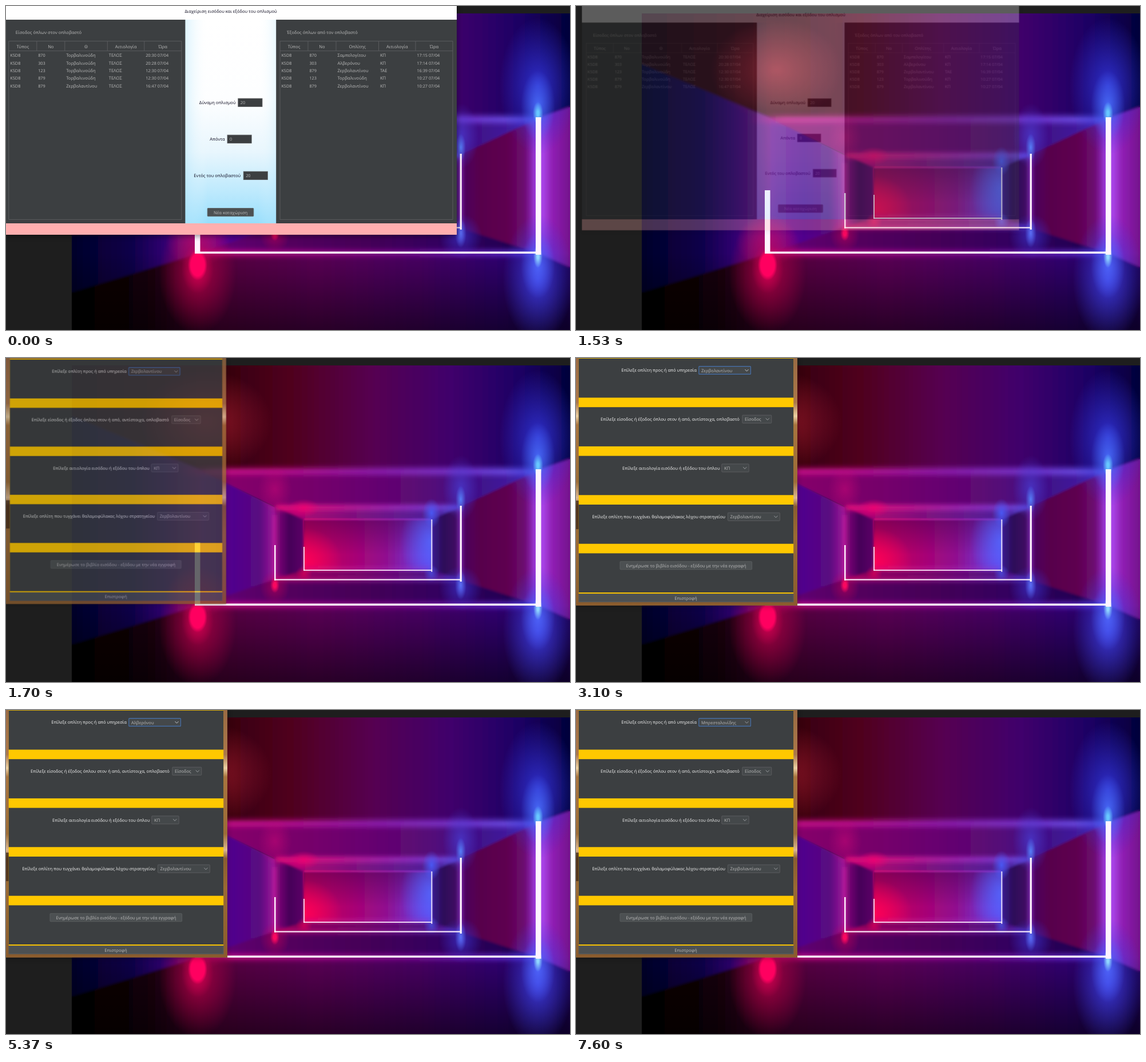
These frames come from a looping animation (986 by 568 pixels, 8000 ms). An HTML page:

```html
<!DOCTYPE html>
<html lang="el">
<head>
<meta charset="utf-8">
<title>Οπλοβαστός</title>
<style>
html, body { margin: 0; width: 100%; height: 100%; overflow: hidden; background: #1e1e1e; }
svg { display: block; width: 986px; height: 568px; }
text { font: 7.6px "Open Sans", "Noto Sans", sans-serif; fill: #bbb; text-rendering: geometricPrecision; white-space: pre; }
.num { font-size: 7.3px; }
.mid { text-anchor: middle; }
.dark { fill: #0c0a1e; }
.white { fill: #f4f4f4; }
.panel { fill: #3c3f41; }
.line { fill: none; stroke: #616365; stroke-width: .8; }
.box { fill: #44484a; stroke: #616365; stroke-width: .8; }
.btn { fill: #4c5052; stroke: #5e6163; stroke-width: .8; }
.chev { fill: none; stroke: #9a9da0; stroke-width: 1; }

/* 1% of the loop is 80 ms */
.anim { animation: 8s step-end infinite; }
#list { transform-origin: 392px 170px; animation-name: leave; }
#form { transform-origin: 193px 185px; animation-name: enter; }
#listShade { animation-name: unfocus; }
#newBtn { animation-name: hover; }
#drop { animation-name: drop; }
#mark { animation-name: mark; }
#chev { animation-name: chev; }
#pick0 { animation-name: pick0; }
#pick1 { animation-name: pick1; }
#pick2 { animation-name: pick2; }

@keyframes leave {
  0% { opacity: 1; transform: none; }
  17.625% { opacity: .99; transform: scale(.999); }
  17.875% { opacity: .95; transform: scale(.997); }
  18.25% { opacity: .87; transform: scale(.9937); }
  18.75% { opacity: .58; transform: scale(.982); }
  19.125% { opacity: .28; transform: scale(.966); }
  19.5% { opacity: .09; transform: scale(.945); }
  19.875%, 100% { opacity: 0; transform: scale(.92); }
}
@keyframes enter {
  0% { opacity: 0; transform: scale(.92); }
  19.875% { opacity: .08; transform: scale(.935); }
  20.375% { opacity: .34; transform: scale(.962); }
  20.75% { opacity: .59; transform: scale(.979); }
  21.25% { opacity: .79; transform: scale(.989); }
  21.75% { opacity: .92; transform: scale(.995); }
  22.25% { opacity: .98; transform: scale(.998); }
  23.125%, 100% { opacity: 1; transform: none; }
}
@keyframes unfocus { 0% { opacity: .4; } 14.875% { opacity: .3; } 15.375%, 100% { opacity: .2; } }
@keyframes hover { 0% { fill: #4c5052; } 6.25%, 100% { fill: #55595c; } }
@keyframes drop {
  0% { opacity: 0; } 44.875% { opacity: 1; } 58.125% { opacity: 0; }
  72.625% { opacity: 1; } 95%, 100% { opacity: 0; }
}
@keyframes mark {
  0% { transform: none; }
  49.625% { transform: translateY(13.36px); }
  50.25% { transform: translateY(26.72px); }
  50.875% { transform: translateY(53.44px); }
  51.375% { transform: translateY(66.8px); }
  77.25% { transform: translateY(13.36px); }
  77.75% { transform: translateY(26.72px); }
  78.625% { transform: translateY(40.08px); }
  79.625% { transform: translateY(66.8px); }
  82.125% { transform: translateY(53.44px); }
  86.5% { transform: translateY(66.8px); }
  86.875% { transform: translateY(93.52px); }
  87.25%, 100% { transform: translateY(106.88px); }
}
@keyframes chev {
  0% { stroke: #9a9da0; } 38.75% { stroke: #c4c7ca; } 49.625% { stroke: #9a9da0; }
  67.125% { stroke: #c4c7ca; } 77.25%, 100% { stroke: #9a9da0; }
}
@keyframes pick0 { 0% { opacity: 1; } 58.125%, 100% { opacity: 0; } }
@keyframes pick1 { 0% { opacity: 0; } 58.125% { opacity: 1; } 95%, 100% { opacity: 0; } }
@keyframes pick2 { 0% { opacity: 0; } 95%, 100% { opacity: 1; } }
</style>
</head>
<body>
<script>
const people = ['Ζερβολαντίνου', 'Τορβαλινούδη', 'Λόρβας', 'Φελουμάντης', 'Εξμορίδης',
  'Αλβερόνου', 'Σαμπελογίτου', 'Ζάλβης', 'Μπρεσταλονίδης', 'Γκιρβάλκος',
  'Βελμουάδης', 'Νερφλάκης', 'Εσβολίου', 'Ροδαμινελάου', 'Χαλβεμιτόπουλος'];

// Drawing helpers; text is placed by the middle of its capitals
const rect = (x, y, w, h, attrs) => `<rect x="${x}" y="${y}" width="${w}" height="${h}" ${attrs}/>`;
const poly = (points, fill) => `<polygon points="${points}" fill="${fill}"/>`;
const text = (x, y, str, cls = '', attrs = '') =>
  `<text x="${x}" y="${y + 2.75}" class="${cls}" ${attrs}>${str}</text>`;
const chevron = (x, y, attrs = 'class="chev"') => `<path d="M${x - 3} ${y - 1.6}l3 3.2 3-3.2" ${attrs}/>`;

let defs = '';
let count = 0;
const stops = list => list.split(' ').map(s => {
  const [color, at, alpha = 1] = s.split(',');
  return `<stop offset="${at}" stop-color="${color}" stop-opacity="${alpha}"/>`;
}).join('');
function linear(list, x1, y1, x2, y2) {
  const id = 'g' + count++;
  defs += `<linearGradient id="${id}" gradientUnits="userSpaceOnUse" x1="${x1}" y1="${y1}" x2="${x2}" y2="${y2}">${stops(list)}</linearGradient>`;
  return `url(#${id})`;
}
const across = (x1, x2, list) => linear(list, x1, 0, x2, 0);
const down = (y1, y2, list) => linear(list, 0, y1, 0, y2);
function glow(cx, cy, rx, ry, color, alpha = 1, core = 0) {
  const id = 'g' + count++;
  defs += `<radialGradient id="${id}">${stops(`${color},${core},${alpha} ${color},${(1 + core) / 2},${alpha * .5} ${color},1,0`)}</radialGradient>`;
  return `<ellipse cx="${cx}" cy="${cy}" rx="${rx}" ry="${ry}" fill="url(#${id})"/>`;
}
const blur = (size, body) => {
  const id = 'b' + count++;
  defs += `<filter id="${id}" filterUnits="userSpaceOnUse" x="-100" y="-100" width="1200" height="800"><feGaussianBlur stdDeviation="${size}"/></filter>`;
  return `<g filter="url(#${id})">${body}</g>`;
};
// Colour runs across, opacity runs down
function veil(points, fill, y1, y2, alphas) {
  const id = 'm' + count++;
  defs += `<mask id="${id}" maskUnits="userSpaceOnUse" x="0" y="0" width="986" height="568">${rect(0, y1, 986, y2 - y1, `fill="${down(y1, y2, alphas)}"`)}</mask>`;
  return `<g mask="url(#${id})">${poly(points, fill)}</g>`;
}

function room() {
  const ceiling = '115,13 986,13 986,177 930,197 340,197 115,102';
  const ceiling2 = '340,197 930,197 796,260 470,260';
  const back = '521,283 744,283 744,372 521,372';
  const band = across(300, 930, '#c40c80,0,0 #d80c88,.1 #cc1094,.28 #9a28c0,.55 #8048ec,.82 #6c6cff,1');
  const band2 = across(470, 796, '#e0107c,0 #d0188c,.3 #9a2cc0,.7 #6450e8,1');
  const walls = [
    [ceiling, across(115, 986, '#140008,0 #36000e,.31 #50001e,.44 #560050,.6 #40006c,.76 #1c0064,.9 #02003a,1')],
    ['115,102 340,197 340,433 115,502', across(115, 340, '#02002a,0 #0c0048,.45 #300070,.72 #70128a,1')],
    ['340,197 470,262 470,388 340,433', across(340, 470, '#6a0c96,0 #50008c,.45 #5a0a80,.8 #a0189a,1')],
    [ceiling2, across(400, 930, '#84006a,0 #72006c,.3 #5a0874,.6 #401088,.8 #4424b0,1')],
    ['470,260 521,283 521,372 470,388', across(470, 521, '#8a0a80,0 #460058,.5 #5c0068,1')],
    ['470,260 796,260 744,283 521,283', across(470, 796, '#c00070,0 #80107c,.4 #542098,.8 #4030b0,1')],
    ['744,283 796,260 796,390 744,372', across(744, 796, '#3a1a90,0 #2c0c58,.4 #480c68,1')],
    [back, across(521, 744, '#d00058,0 #ac0070,.35 #901090,.65 #6048f0,1')],
    ['521,372 744,372 796,388 470,388', across(470, 796, '#8c0058,0 #640060,.5 #3c1488,1')],
    ['470,388 796,388 930,433 339,433', across(339, 930, '#64007c,0 #54005e,.25 #440058,.5 #300060,.75 #1c0048,1')],
    ['796,260 930,197 930,433 796,390', across(796, 930, '#4a0060,0 #58004c,.25 #5e0050,.6 #6c0c70,.82 #9830d0,1')],
    ['930,197 986,177 986,458 930,437', across(930, 986, '#b050f0,0 #9020b4,.45 #74108c,1')],
    ['339,433 930,433 986,458 986,568 115,568 115,502', across(115, 986, '#000000,0 #140008,.14 #580040,.3 #5a0056,.5 #480064,.7 #300070,.85 #1c0058,1')],
  ].map(w => poly(...w)).join('');

  const shade = rect(115, 433, 871, 135, `fill="${down(433, 568, '#000,0,0 #000,.4,.22 #000,1,.55')}"`)
    + poly(back, down(283, 345, '#400050,0,.5 #400050,1,0'));
  const haze = glow(350, 112, 115, 90, '#b82034', .7)
    + veil(ceiling, band, 40, 197, '#fff,0,0 #fff,.45,.16 #fff,.75,.4 #fff,1,.75')
    + veil(ceiling2, band, 197, 232, '#fff,0,.65 #fff,.5,.25 #fff,1,0')
    + blur(5, rect(300, 192, 630, 13, `fill="${band}" opacity=".7"`))
    + veil(ceiling2, band2, 232, 260, '#fff,0,0 #fff,1,.6')
    + blur(4, rect(472, 257, 322, 10, `fill="${band2}" opacity=".85"`))
    + blur(1.2, rect(521, 282, 223, 2.5, `fill="${band2}" opacity=".8"`))
    + blur(5, rect(340, 428, 590, 10, `fill="${across(340, 930, '#f0108c,0 #9010a0,.6 #6040ff,1')}" opacity=".75"`))
    + blur(4, rect(470, 384, 326, 8, `fill="${band2}" opacity=".6"`) + rect(521, 367, 223, 7, `fill="${band2}" opacity=".7"`))
    + blur(6, rect(922, 200, 19, 232, 'fill="#a848f0" opacity=".7"'))
    + blur(3, rect(790, 262, 9, 124, 'fill="#9838d0" opacity=".6"') + rect(467, 275, 6, 113, 'fill="#d020a0" opacity=".6"'));
  const glows = [
    [335, 412, 56, 46, '#c81080', .6], [335, 470, 68, 105, '#b80048', .85], [335, 460, 28, 44, '#e80058', .7], [335, 454, 17, 27, '#ff0060', 1, .7],
    [930, 140, 68, 120, '#3030d0', .95], [930, 175, 30, 62, '#4a70ff', .9], [930, 188, 9, 20, '#68c8ff', 1, .2],
    [930, 478, 62, 112, '#3c3ce0', .95], [930, 455, 30, 58, '#5068ff', .9], [930, 439, 8, 20, '#90d8ff', 1, .2],
    [795, 228, 32, 58, '#4840d8', .7], [795, 248, 9, 24, '#5888ff', .9],
    [795, 404, 38, 40, '#3c34d0', .7], [795, 398, 10, 26, '#6078ff', .9],
    [470, 230, 30, 42, '#d00878', .5], [470, 402, 26, 30, '#c00058', .6], [470, 398, 8, 14, '#ff0860', .95, .3],
    [521, 263, 28, 16, '#f00070', .8], [521, 378, 15, 14, '#e00058', .7],
    [744, 272, 16, 26, '#4860ff', .85], [744, 378, 14, 15, '#4858f0', .7],
  ].map(g => glow(...g)).join('');
  defs += `<clipPath id="back"><polygon points="${back}"/></clipPath><clipPath id="photo">${rect(115, 13, 871, 555, '')}</clipPath>`;
  const lights = `<g clip-path="url(#back)">${glow(522, 358, 66, 60, '#ff0058', .95)}${glow(744, 322, 55, 80, '#5468ff', .85)}</g>`;
  const tubes = [
    [520, 331, 2, 42, .85], [520, 371, 225, 2, .85], [743.3, 283, 2, 92, .85],
    [469, 328, 2.6, 62, .95], [469, 387.5, 327, 2.2, .95], [793.6, 259, 3.2, 133, 1],
    [330, 323, 9.5, 111, 1], [330, 430.5, 600, 3.6, 1], [926, 195, 9.5, 241, 1],
  ].map(([x, y, w, h, a]) => rect(x, y, w, h, `fill="#fff4ff" opacity="${a}"`)).join('');
  return `<g clip-path="url(#photo)">${walls}${blur(2, walls)}${shade}${lights}${haze}${glows}${tubes}</g>`;
}

function table(x, heads, rows) {
  const cols = [0, 49, 98, 172.5, 237, 302];
  let out = rect(x, 61.7, 302, 312.6, 'class="line"')
    + `<path class="line" d="M${x} 78.7h302${cols.slice(1, 5).map(c => `M${x + c} 62v16.7`).join('')}"/>`;
  heads.forEach((h, i) => out += text(x + (cols[i] + cols[i + 1]) / 2, 71, h, 'mid'));
  rows.forEach((row, r) => row.forEach((cell, i) =>
    out += text(x + cols[i] + 2.4, 86.4 + r * 13.35, cell, i == 2 || i == 3 ? '' : 'num')));
  return out;
}

function listWindow() {
  const row = (no, who, why, time) => ['K5D8', no, who, why, time + ' 07/04'];
  const [a, b, , , , c, d] = people;
  const field = (label, mid, x, y, value) => text(mid, y, label, 'mid dark')
    + rect(x, y - 7.2, 42.2, 14.4, 'class="box" style="fill:#3c3f41"') + text(x + 4, y + .3, value, 'num');
  const heads = third => ['Τύπος', 'No', third, 'Αιτιολογία', 'Ώρα'];
  return `<g id="list" class="anim">
    <g id="listShade" class="anim">${blur(5, rect(-3, -60, 792, 464, ''))}</g>`
    + rect(-3, -61, 791, 86, 'fill="#fff"')
    + rect(313, 24, 160, 357, `fill="${down(24, 381, '#fff,0 #fdfeff,.4 #e8f6fd,.65 #bce9fd,.85 #98defc,1')}"`)
    + rect(313, 24, 160, 357, `fill="${across(313, 473, '#b4e6fb,0,.45 #fff,.25,0 #fff,.8,0 #b4e6fb,1,.3')}"`)
    + rect(-3, 24, 316.4, 357, 'class="panel"') + rect(472.2, 24, 315.8, 357, 'class="panel"')
    + rect(-3, 381, 791, 20, 'fill="#ffafaf"')
    + text(393, 9.3, 'Διαχείριση εισόδου και εξόδου του οπλισμού', 'mid dark')
    + text(74.5, 46.7, 'Είσοδος όπλων στον οπλοβαστό', 'mid')
    + text(553, 46.7, 'Έξοδος όπλων από τον οπλοβαστό', 'mid')
    + table(4.8, heads('Θ'), [
      row(870, b, 'ΤΕΛΟΣ', '20:30'), row(303, b, 'ΤΕΛΟΣ', '20:28'), row(123, b, 'ΤΕΛΟΣ', '12:30'),
      row(879, b, 'ΤΕΛΟΣ', '12:30'), row(879, a, 'ΤΕΛΟΣ', '16:47')])
    + table(479, heads('Οπλίτης'), [
      row(870, d, 'ΚΠ', '17:15'), row(303, c, 'ΚΠ', '17:14'), row(879, a, 'ΤΑΕ', '16:39'),
      row(123, b, 'ΚΠ', '10:27'), row(879, a, 'ΚΠ', '10:27')])
    + field('Δύναμη οπλισμού', 369.7, 405.8, 169.3, 20)
    + field('Απόντα', 369.5, 387, 233.3, 0)
    + field('Εντός του οπλοβαστού', 369.3, 415.2, 297.3, 20)
    + rect(352.2, 354.5, 80.6, 14.2, 'id="newBtn" class="btn anim" rx="1"')
    + text(392.5, 362, 'Νέα καταχώριση', 'mid') + '</g>';
}

function formWindow() {
  const combo = (x, y, w, value) => rect(x, y - 7, w, 14, 'class="box" rx="1"')
    + text(x + 4.2, y + .2, value) + chevron(x + w - 7, y);
  const sky = down(0, 434, '#9a6a44,0 #ac784a,.18 #ecd0a4,.235 #a8743f,.27 #9c6c38,.5 #dcb890,.565 #8a5c30,.6 #9a6a34,.72 #8a5c2e,1');
  let out = `<g id="form" class="anim">${blur(5, rect(-4, -60, 391, 495, 'opacity=".3"'))}`
    + rect(-4, -64, 391, 498, `fill="${sky}"`)
    + rect(-4, 250, 9, 50, 'fill="#3a2414" opacity=".7"')
    + rect(4.7, -.8, 375.5, 414, 'fill="#ffc800"');
  for (let i = 0; i < 5; i++) out += rect(4.7, .8 + i * 85.4, 375.5, 68.7, 'class="panel"');
  out += rect(4.7, 413.2, 375.5, 15, 'class="panel"')
    + rect(5, 414, 375, 13.6, 'class="btn"') + text(192, 421, 'Επιστροφή', 'mid')
    + text(145, 21.7, 'Επίλεξε οπλίτη προς ή από υπηρεσία', 'mid white')
    + text(164.5, 107.2, 'Επίλεξε είσοδος ή έξοδος όπλου στον ή από, αντίστοιχα, οπλοβαστό', 'mid white')
    + text(166.3, 192.8, 'Επίλεξε αιτιολογία εισόδου ή εξόδου του όπλου', 'mid white')
    + text(144.5, 278.3, 'Επίλεξε οπλίτη που τυγχάνει θαλαμοφύλακας λόχου στρατηγείου', 'mid white')
    + rect(214.8, 14.6, 90.6, 13.8, 'class="box" rx="1" style="stroke:#4672b0;stroke-width:1.1"')
    + chevron(298.5, 21.6, 'id="chev" class="chev anim"')
    + [0, 5, 8].map((n, i) => text(219, 21.8, people[n], 'anim', `id="pick${i}"`)).join('')
    + combo(290.8, 107.2, 51, 'Είσοδος') + combo(254.8, 192.8, 47.4, 'ΚΠ') + combo(265.4, 278.3, 91, people[0])
    + rect(77, 356.8, 230.6, 14, 'class="btn" rx="1"')
    + text(192.4, 364, 'Ενημέρωσε το βιβλίο εισόδου - εξόδου με την νέα εγγραφή', 'mid');
  const menu = rect(214.6, 28.9, 91.2, 201.6, 'class="line" style="fill:#3c3f41"')
    + rect(298.8, 29.3, 6.6, 200.8, 'fill="#414547"') + rect(298.8, 29.3, 6.6, 150.7, 'fill="#5a5d5f"')
    + rect(215, 29.9, 83.8, 13.4, 'id="mark" class="anim" fill="#4b6eaf"')
    + people.map((p, i) => text(219, 36.9 + i * 13.36, p)).join('');
  return out + `<g id="drop" class="anim">${menu}</g></g>`;
}

const scene = room() + listWindow() + formWindow();
document.body.innerHTML = `<svg viewBox="0 0 986 568"><defs>${defs}</defs>${scene}</svg>`;
</script>
</body>
</html>
```
